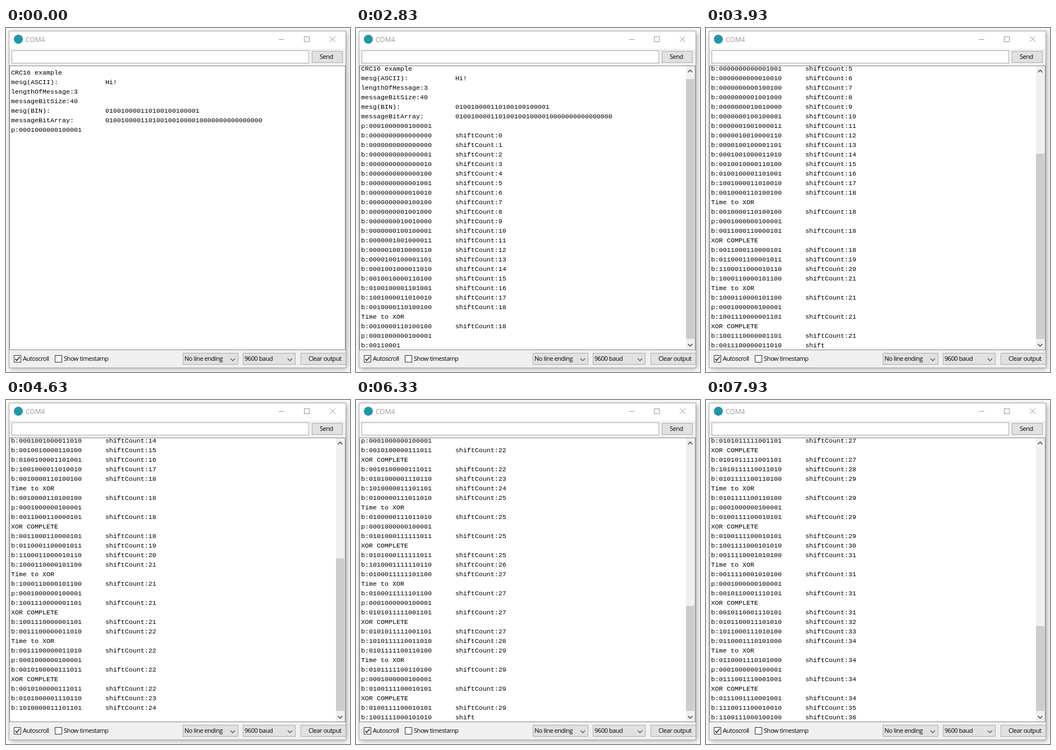
These frames come from a looping animation (613 by 613 pixels, 8000 ms). An HTML page with a canvas:

```html
<!DOCTYPE html>
<html lang="en">
<head>
<meta charset="utf-8">
<title>Serial monitor</title>
<style>
html, body { margin: 0; width: 100%; height: 100%; overflow: hidden; background: #fff; }
canvas { display: block; width: 613px; height: 613px; }
</style>
</head>
<body>
<canvas id="stage" width="613" height="613"></canvas>
<script>
const ctx = document.getElementById('stage').getContext('2d');
const LOOP = 8000, START = 1030, TICK = 100;
const ROW = 17, VIEW = 505, COLUMN = 24;
const UI = '11px "Open Sans", sans-serif';
const MONO = '11.667px "Liberation Mono", monospace';

// ---- Serial output: chunks of text with their arrival times ----
const MESSAGE = '010010000110100100100001';
const BITS = MESSAGE + '0'.repeat(16);
const POLY = 0x1021;
const chunks = [];

const send = (time, text) => chunks.push({ time, text });
const bin = n => n.toString(2).padStart(16, '0');
const cells = (a, b) => a.padEnd(COLUMN) + b + '\n';
const bLine = (b, count) => cells('b:' + bin(b), 'shiftCount:' + count);
const pLine = 'p:' + bin(POLY) + '\n';

function buildOutput() {
  send(0, 'CRC16 example\n' + cells('mesg(ASCII):', 'Hi!') +
    'lengthOfMessage:3\nmessageBitSize:40\n' + cells('mesg(BIN):', MESSAGE) +
    cells('messageBitArray:', BITS) + pLine);

  let b = 0, time = 945, afterXor = false;
  send(time, bLine(b, 0));
  for (let count = 1; count <= 36; count++) {
    const carry = b >> 15;
    b = (b << 1 | +BITS[count - 1]) & 0xffff;
    const line = bLine(b, count);

    if (afterXor) {
      // The first line after an XOR arrives in two pieces.
      const cut = COLUMN + 5;
      send(time, line.slice(0, cut));
      send(time + 80, line.slice(cut));
      if (carry) time += 80;
    } else {
      time += 97;
      if (chunks.split) time += 33;
      send(time, count === 36 ? line.trimEnd() : line);
    }
    chunks.split = afterXor;
    afterXor = false;

    if (carry && count < 36) {
      const before = bLine(b, count);
      b ^= POLY;
      const after = bLine(b, count);
      send(time, 'Time to XOR\n');
      send(time + 100, before + pLine + after.slice(0, 10));
      send(time + 200, after.slice(10) + 'XOR COMPLETE\n');
      time += count < 31 ? 473 : 533;
      send(time, after);
      afterXor = true;
      chunks.split = false;
    }
  }
}
buildOutput();

const outputAt = time =>
  chunks.filter(c => c.time <= time).map(c => c.text).join('').split('\n');

// ---- Drawing helpers ----
function fill(x, y, w, h, color) {
  ctx.fillStyle = color;
  ctx.fillRect(x, y, w, h);
}

function box(x, y, w, h, color, border) {
  fill(x, y, w, h, border);
  fill(x + 1, y + 1, w - 2, h - 2, color);
}

function stroke(color, width, ...paths) {
  ctx.strokeStyle = color;
  ctx.lineWidth = width;
  ctx.beginPath();
  for (const path of paths)
    path.forEach(([x, y], i) => i ? ctx.lineTo(x, y) : ctx.moveTo(x, y));
  ctx.stroke();
}

function text(str, x, y, font = UI, color = '#000', spacing = '-0.45px') {
  ctx.font = font;
  ctx.letterSpacing = spacing;
  ctx.fillStyle = color;
  ctx.fillText(str, x, y);
}

const chevron = (x, y, dir, color, width) =>
  stroke(color, width, [[x - 4, y - 2 * dir], [x, y + 2 * dir], [x + 4, y - 2 * dir]]);

function button(x, y, w, h, label, labelX) {
  box(x, y, w, h, '#e1e1e1', '#adadad');
  text(label, labelX, y + 14);
}

function combo(x, w, label) {
  button(x, 579, w, 21, label, x + 3);
  chevron(x + w - 10, 591, 1, '#444', 1.1);
}

function checkbox(x, label, checked) {
  box(x, 583, 13, 13, '#fff', '#333');
  if (checked) stroke('#1c1c3c', 1.5, [[x + 2.5, 589.5], [x + 5, 592.5], [x + 10.5, 586]]);
  text(label, x + 16, 593);
}

function drawWindow() {
  fill(0, 0, 613, 613, '#fff');
  ctx.save();
  ctx.shadowColor = 'rgba(0,0,0,0.35)';
  ctx.shadowBlur = 9;
  ctx.shadowOffsetX = ctx.shadowOffsetY = 2;
  fill(5, 5, 601, 601, '#aaa');
  ctx.restore();
  fill(6, 6, 599, 599, '#f0f0f0');
  fill(6, 6, 599, 31, '#fff');

  ctx.fillStyle = '#2196ab';
  ctx.beginPath();
  ctx.arc(22, 20, 8, 0, Math.PI * 2);
  ctx.fill();
  text('COM4', 35, 25, '12px "Open Sans", sans-serif', '#999', '0px');

  fill(486, 20, 10, 1, '#999');
  box(531, 15, 10, 10, '#fff', '#999');
  stroke('#999', 1, [[577, 15], [587, 25]], [[587, 15], [577, 25]]);

  box(10, 40, 530, 23, '#fff', '#abadb3');
  button(545, 41, 55, 21, 'Send', 559);
  box(6, 67, 599, 507, '#fff', '#828790');

  checkbox(14, 'Autoscroll', true);
  checkbox(87, 'Show timestamp', false);
  combo(315, 99, 'No line ending');
  combo(422, 94, '9600 baud');
  button(525, 579, 81, 21, 'Clear output', 539);
}

function drawOutput(lines) {
  const scroll = Math.max(0, 7 + ROW * (lines.length - 30));
  ctx.save();
  ctx.beginPath();
  ctx.rect(7, 68, 597, VIEW);
  ctx.clip();
  lines.forEach((line, i) => {
    const y = 83 + ROW * i - scroll;
    if (y > 60) text(line, 9, y, MONO, '#000', '0px');
  });
  if (scroll) drawScrollbar(scroll);
  ctx.restore();
}

function drawScrollbar(scroll) {
  const track = 470, total = VIEW + scroll;
  const top = Math.round(85 + track * scroll / total);
  fill(588, 68, 16, VIEW, '#f0f0f0');
  fill(588, top, 15, 554 - top, '#cdcdcd');
  chevron(595.5, 77, -1, '#505050', 1.6);
  chevron(595.5, 565, 1, '#505050', 1.6);
}

function draw() {
  const t = performance.now() % LOOP;
  const shown = t < START ? 0 : START + Math.floor((t - START) / TICK) * TICK;
  drawWindow();
  drawOutput(outputAt(shown));
  requestAnimationFrame(draw);
}
draw();
</script>
</body>
</html>
```
